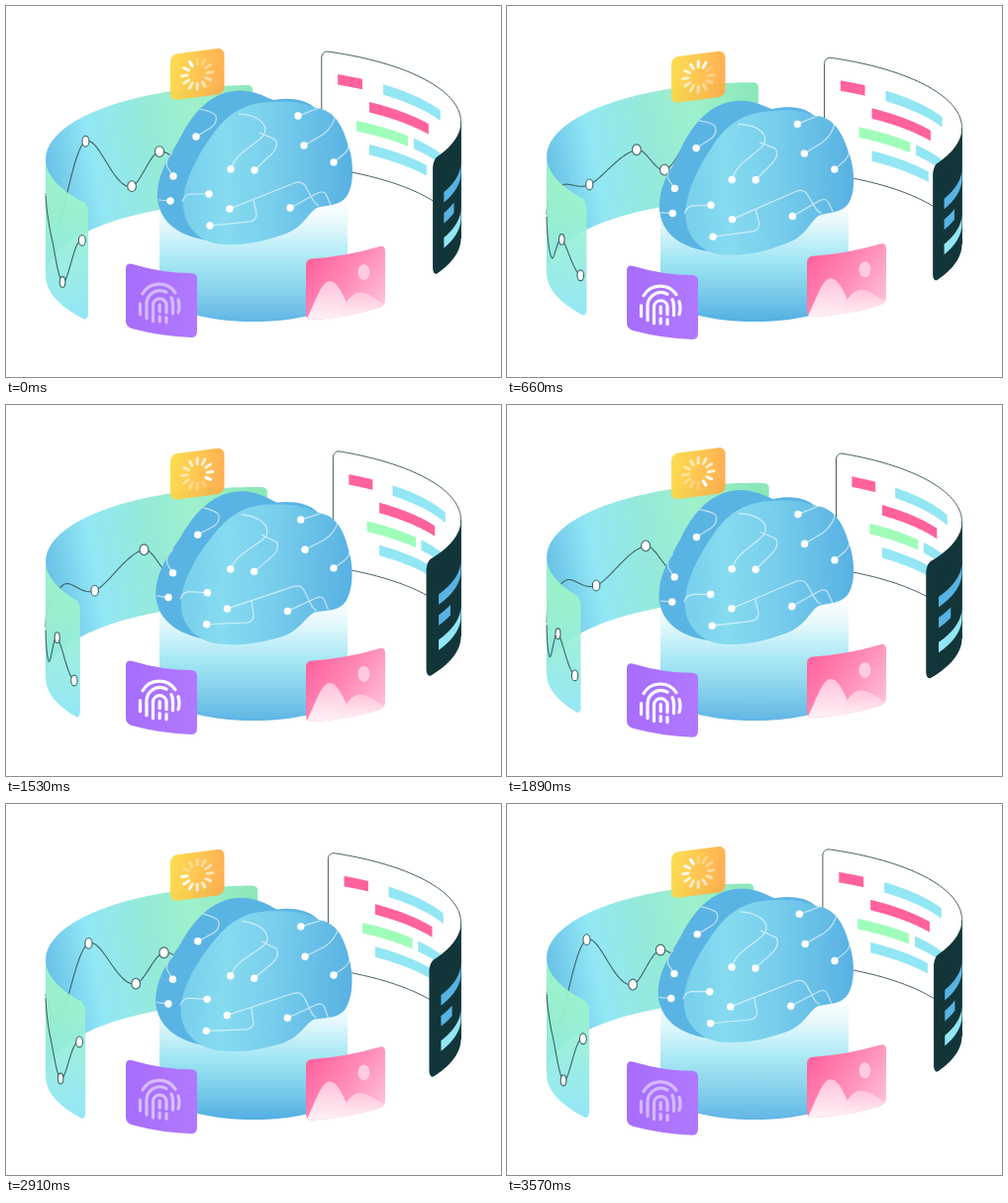
These frames come from a looping animation (500 px wide and 375 px high, 3.6 s). An HTML page with a canvas:

```html
<!DOCTYPE html>
<html lang="en">
<head>
<meta charset="utf-8">
<title>Brain and data panels</title>
<style>
  html, body { margin: 0; width: 100%; height: 100%; overflow: hidden; background: #fff; }
  canvas { display: block; }
</style>
</head>
<body>
<canvas id="stage" width="500" height="375"></canvas>
<script>
const ctx = document.getElementById('stage').getContext('2d');
const LOOP = 3600, TAU = Math.PI * 2, EDGE = Math.PI / 2, CENTER = 249.8, RADIUS = 209.7;
const { sin, cos, abs, sqrt, max } = Math;
const INK = '#12353a', BLUE = '#58b3e3', CYAN = '#93e6f4', PINK = '#ff629d', GREEN = '#9ffdb9';

const smooth = u => { u = Math.min(1, max(0, u)); return u * u * (3 - 2 * u); };

function gradient(x0, y0, x1, y1, ...stops) {
  const g = ctx.createLinearGradient(x0, y0, x1, y1);
  stops.forEach(([at, color]) => g.addColorStop(at, color));
  return g;
}

function fill(path, style) {
  ctx.fillStyle = style;
  ctx.fill(path);
}

function stroke(path, style, width) {
  ctx.strokeStyle = style;
  ctx.lineWidth = width;
  ctx.stroke(path);
}

function ellipse(x, y, rx, ry = rx) {
  const p = new Path2D();
  p.ellipse(x, y, rx, ry, 0, 0, TAU);
  return p;
}

// Point on a cylinder wall: angle from the far side, depth below the rim.
const onWall = (wall, angle, h) =>
  [CENTER + RADIUS * sin(angle), wall.y - wall.ry * cos(angle) + h];

// Band of wall between two angles, with optional corner radius at each end.
function band(wall, a, b, h0, h1, ra = 0, rb = 0) {
  const steps = 80, top = [], bottom = [];
  const inset = (r, d) => d < r ? r - sqrt(r * r - (r - d) ** 2) : 0;
  for (let i = 0; i <= steps; i++) {
    const angle = a + (b - a) * (1 - cos(Math.PI * i / steps)) / 2;
    const cut = max(inset(ra, (angle - a) * RADIUS), inset(rb, (b - angle) * RADIUS));
    top.push(onWall(wall, angle, h0 + cut));
    bottom.unshift(onWall(wall, angle, h1 - cut));
  }
  const p = new Path2D();
  [...top, ...bottom].forEach(([x, y]) => p.lineTo(x, y));
  p.closePath();
  return p;
}

// Chart knots: angle, height in each of two states, has a marker.
const KNOTS = [
  [-2.172, 39.5, 82.5, 1], [-1.976, 94.5, 52.5, 1], [-1.815, 62, 88, 0],
  [-1.57, 36, 60, 0], [-1.23, 91, 54, 0], [-.94, 26, 78, 1],
  [-.625, 88, 52, 1], [-.469, 59, 83, 1], [-.3, 80, 45, 0]
];

function chart(wall, mix, front) {
  const pts = KNOTS.map(([a, h0, h1, dot]) => ({ a: a + wall.turn, h: h0 + (h1 - h0) * mix, dot }));
  const slope = i => {
    const p = pts[i - 1], q = pts[i], r = pts[i + 1];
    return !p || !r || (q.h - p.h) * (r.h - q.h) <= 0 ? 0 : (r.h - p.h) / (r.a - p.a);
  };
  const visible = a => (a < -EDGE) === front;
  const line = new Path2D();
  for (let i = 0; i < pts.length - 1; i++) {
    const p = pts[i], q = pts[i + 1], w = q.a - p.a;
    for (let u = 0; u < 1.01; u += .04) {
      const a = p.a + w * u, s = smooth(u);
      const h = p.h * (1 - s) + q.h * s
        + w * u * (1 - u) * ((1 - u) * slope(i) - u * slope(i + 1));
      if (visible(a)) line.lineTo(...onWall(wall, a, h));
    }
  }
  stroke(line, '#3d6367', 1.1);
  pts.filter(p => p.dot && visible(p.a)).forEach(p => {
    const marker = ellipse(...onWall(wall, p.a, p.h), 1.4 + 3.6 * abs(cos(p.a)), 5.4);
    fill(marker, '#fff');
    stroke(marker, '#3d6367', 1.1);
  });
}

const LEFT_END = -2.2226, LEFT_START = -.003, HEIGHT = 118;

function leftBack(wall, mix) {
  fill(band(wall, -EDGE, LEFT_START + wall.turn, 0, HEIGHT, 0, 5), gradient(40, 170, 260, 130,
    [0, '#67bfe6'], [.22, '#92e7f5'], [.5, '#95ead8'], [.7, '#9ef1cc'], [1, '#8ce7b8']));
  chart(wall, mix, false);
}

function leftFront(wall, mix) {
  ctx.globalAlpha = .93;
  fill(band(wall, LEFT_END + wall.turn * .95, -EDGE, 0, HEIGHT, 8, 0), gradient(0, 165, 0, 312,
    [0, '#9ff6c6'], [.35, '#9bf2cf'], [1, '#8de5f5']));
  ctx.globalAlpha = 1;
  chart(wall, mix, true);
}

// Code bars: start angle, end angle, depth, colour.
const BARS = [
  [.417, .551, 21.5, PINK], [.674, 1.12, 21.5, CYAN], [.591, 1.003, 43, PINK],
  [.518, .838, 65, GREEN], [.881, 1.15, 65, CYAN], [.591, .985, 86, CYAN]
];
const DARK_BARS = [[1.5, 1.976, 41, BLUE], [1.828, 1.976, 62, BLUE], [1.5, 1.976, 87, CYAN]];

function bars(wall, list, from) {
  list.forEach(([a, b, h, color]) =>
    fill(band(wall, max(from, a + wall.turn), b + wall.turn, h, h + 10.5), color));
}

function rightBack(wall) {
  const sheet = band(wall, .333 + wall.turn, EDGE, 0, HEIGHT, 7, 0);
  fill(sheet, '#fff');
  bars(wall, BARS, 0);
  stroke(sheet, INK, .8);
}

function rightFront(wall) {
  fill(band(wall, EDGE, 2.095 + wall.turn, 0, HEIGHT, 0, 9), INK);
  bars(wall, DARK_BARS, EDGE);
}

function pedestal(glow) {
  ctx.globalAlpha = .9 + .1 * glow;
  fill(new Path2D('M155 195V288A95 31 0 0 0 345 288V195Z'), gradient(0, 195, 0, 319,
    [0, '#fff'], [.2, '#e4f8fc'], [.5, '#9fe6f4'], [.75, '#7accea'], [1, '#50aee2']));
  ctx.globalAlpha = 1;
}

const BACK_LOBE = new Path2D(`M153 195C152 168 166 152 176 133C190 105 210 85 238 85.5
  C252 86 260 91 270 95C286 92 302 94 311 102L280 200L215 238C180 236 156 222 153 195Z`);
const FRONT_LOBE = new Path2D(`M179 200C179 178 193 152 208 131C225 106 245 97 270 97
  C290 95 302 99 313 103C333 105 341 124 346 142C352 160 351 181 345 191
  C338 203 322 201 314 204C305 209 301 223 283 230C262 237 247 242 220 241C197 240 179 224 179 200Z`);
const TRACES = new Path2D(`M192 132L207 123Q214 118 212 111Q210 107 195 104
  M169 172L163 163Q160 157 168 148M166 197L154 196M205 190L186 190Q180 191 178 198
  M227 165Q231 154 239 148L257 134Q265 127 260 119Q253 110 235 109
  M251 166L268 150Q276 142 272 135L256 128
  M226 205L291 179Q299 176 303 183L309 194Q312 200 316 202
  M206 222L246 218Q253 217 253 210L250 196M287 204L315 189Q322 186 324 192L328 201
  M295 111L314 104Q321 101 322 98M301 141L320 130Q331 122 333 109M331 158L341 150Q347 145 346 138`);
const NODES = [[192, 132], [169, 172], [166, 197], [205, 190], [227, 165], [251, 166],
  [226, 205], [206, 222], [287, 204], [295, 111], [301, 141], [331, 158]];

function brain(phase) {
  ctx.save();
  ctx.translate(251, 160 + 5.85 * (1 - cos(phase)));
  ctx.rotate(.0091 * (1 - cos(phase)) - .065 * sin(phase));
  ctx.translate(-251, -160);
  fill(BACK_LOBE, '#5ab4e3');
  fill(FRONT_LOBE, gradient(178, 0, 350, 0,
    [0, '#78cfec'], [.25, '#86dbf0'], [.55, '#78cdec'], [1, '#57b1e2']));
  ctx.clip(FRONT_LOBE.constructor === Path2D ? lobes : FRONT_LOBE);
  stroke(TRACES, 'rgba(255,255,255,.62)', 1.2);
  NODES.forEach(([x, y]) => fill(ellipse(x, y, 3.7), '#fff'));
  ctx.restore();
}
const lobes = new Path2D(BACK_LOBE);
lobes.addPath(FRONT_LOBE);

function loaderCard(dy, head) {
  ctx.save();
  ctx.translate(193.2, 68.7 + dy);
  ctx.transform(1, -.13, 0, 1, 0, 0);
  const card = new Path2D();
  card.roundRect(-27.3, -23, 54.6, 46.5, 7);
  ctx.globalAlpha = .94;
  fill(card, gradient(-27, 0, 27, 8, [0, '#fcd946'], [1, '#ffaa48']));
  ctx.globalAlpha = 1;
  ctx.lineCap = 'round';
  for (let i = 0; i < 12; i++) {
    const angle = i * TAU / 12;
    const lag = ((head - angle) % TAU + TAU) % TAU / TAU;
    const spoke = new Path2D();
    spoke.moveTo(10 * cos(angle), 10 * sin(angle));
    spoke.lineTo(15.5 * cos(angle), 15.5 * sin(angle));
    stroke(spoke, `rgba(255,255,255,${1 - .8 * lag})`, 3);
  }
  ctx.restore();
}

const PURPLE_CARD = new Path2D(`M121 266Q121 259 128 261Q158 270 187 270Q193 270 193 276V329
  Q193 335 187 335Q157 334 127 326Q121 324 121 318Z`);
const PRINT = new Path2D(`M135.500 311V300M138 290A19.500 19.500 0 0 1 171 289M174 296Q176 303 174 309
  M142 315V300A13.500 13.500 0 0 1 162 288.500M167 294Q169 298 168.500 307V310
  M148.500 318V301A6.800 6.800 0 0 1 162 301V309M162 314V319M155.200 301V308M155.200 313V318`);

function printCard(dy, glow) {
  ctx.save();
  ctx.translate(0, dy);
  fill(PURPLE_CARD, gradient(121, 0, 193, 0, [0, '#a66dfb'], [1, '#b179ff']));
  ctx.lineCap = 'round';
  ctx.translate(0, .8);
  stroke(PRINT, `rgba(255,255,255,${.5 + .5 * glow})`, 3.2);
  ctx.restore();
}

const PICTURE_CARD = new Path2D(`M303 262Q303 256 309 255.500Q344 253 376 243.500Q383 241 383 248V297
  Q383 303 377 305Q345 315 309 317Q303 317 303 311Z`);

function pictureCard(dy) {
  ctx.save();
  ctx.translate(0, dy);
  fill(PICTURE_CARD, gradient(308, 258, 376, 308, [0, '#ff659f'], [.5, '#ff8cb8'], [1, '#ffbfd9']));
  ctx.clip(PICTURE_CARD);
  fill(ellipse(361.5, 269, 6, 8), '#ffcbe0');
  const snow = top => gradient(0, top, 0, 316, [0, '#ffc3da'], [1, '#fff0f6']);
  fill(new Path2D('M303 318C312 301 318 278 327 278C337 278 343 300 353 318Z'), snow(278));
  fill(new Path2D('M332 318C342 301 349 289 358 289.500C369 290 375 299 386 303V318Z'), snow(289));
  ctx.restore();
}

function draw(time) {
  const slow = TAU * time / LOOP, phase = slow * 2;
  const mix = smooth(time / 800) - smooth((time - 1800) / 1300);
  const glow = (1 - cos(phase)) / 2;
  const left = { y: 155 - 3.8 * sin(phase), ry: 75, turn: .0375 * (1 - cos(slow)) };
  const right = {
    y: 117 + 2.5 * (1 - cos(phase)) + 2.45 * sin(phase), ry: 76,
    turn: .0365 * (1 - cos(slow - .35))
  };
  ctx.fillStyle = '#fff';
  ctx.fillRect(0, 0, 500, 375);
  leftBack(left, mix);
  rightBack(right);
  pedestal(glow);
  brain(phase);
  leftFront(left, mix);
  rightFront(right);
  loaderCard(3.3 * glow, 4.36 + slow);
  printCard(2.6 * sin(phase), mix);
  pictureCard(-3.6 * sin(phase));
}

function frame() {
  draw(performance.now() % LOOP);
  requestAnimationFrame(frame);
}
frame();
</script>
</body>
</html>
```
